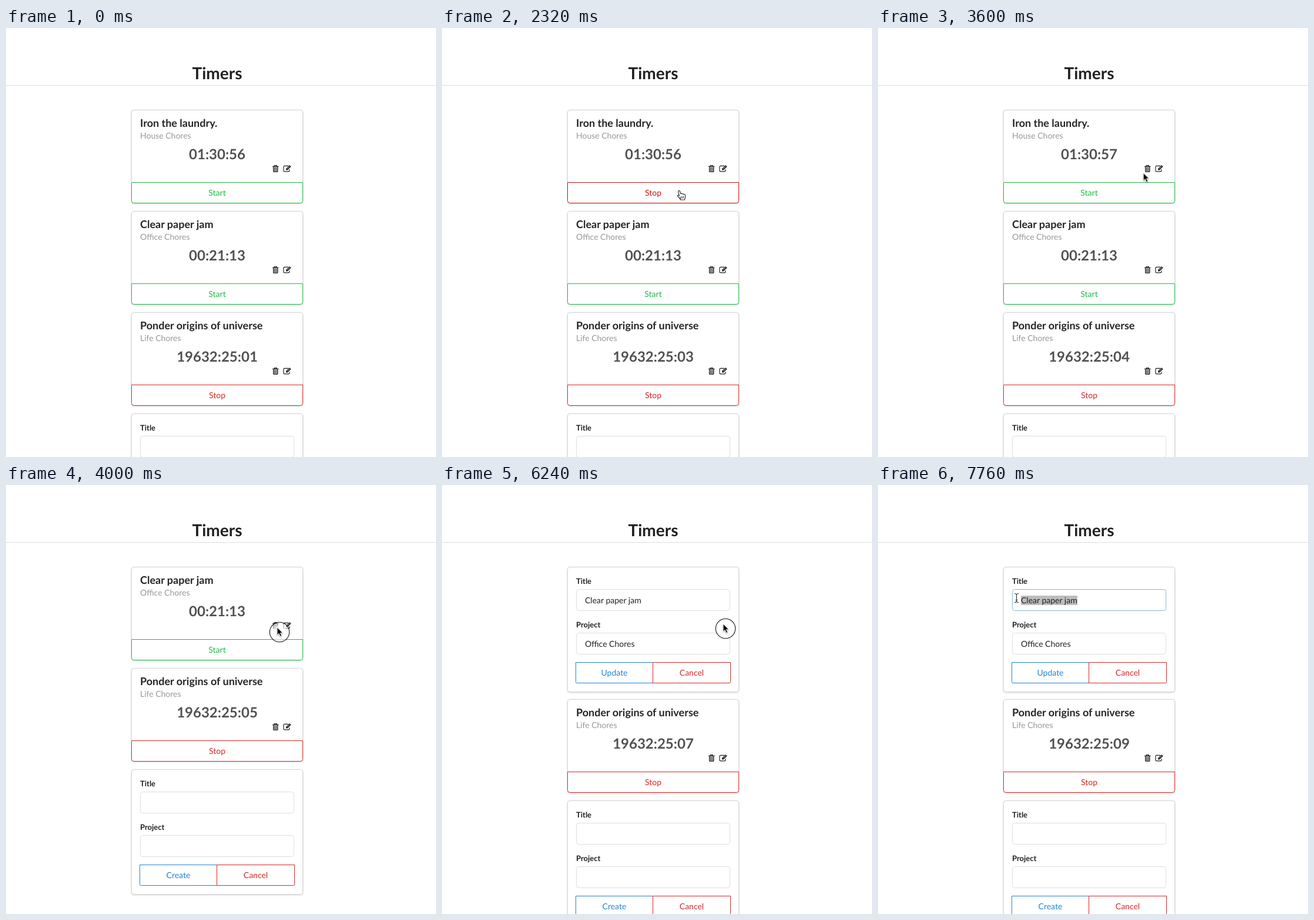
Write an HTML page that moves like this. It is 731 by 729 pixels and loops after 8 s.

```html
<!DOCTYPE html>
<html lang="en">
<head>
<meta charset="utf-8">
<title>Timers</title>
<style>
  html, body { margin: 0; width: 100%; height: 100%; overflow: hidden; background: #fff; }
  svg { display: block; font: 14px Lato, sans-serif; text-rendering: geometricPrecision; }
  .page { font: bold 28px Lato, sans-serif; fill: #212121; }
  .title { font: bold 18px Lato, sans-serif; fill: #262626; }
  .clock { font: bold 24px Lato, sans-serif; fill: #515151; }
  .label { font: bold 13px Lato, sans-serif; fill: #212121; }
  .meta { fill: #999; }
  .value { fill: #212121; }
  .mid { text-anchor: middle; }
  .card { fill: #fff; stroke: #d4d4d5; filter: drop-shadow(0 1px 1.5px #d4d4d5); }
  .arrow { filter: drop-shadow(0 1px 1px #0006); }
</style>
</head>
<body>
<svg id="stage" width="731" height="729" viewBox="0 0 731 729">
  <defs>
    <radialGradient id="glow">
      <stop offset=".5" stop-color="#fff" stop-opacity=".9"/>
      <stop offset="1" stop-color="#fff" stop-opacity=".3"/>
    </radialGradient>
    <g id="icons">
      <g fill="none" stroke="#222">
        <path d="M453 235.3H463.4M456.2 235V233.6H460.2V235" stroke-width="1.3"/>
        <path d="M454.6 236V243.4Q454.6 244.4 455.6 244.4H460.8Q461.8 244.4 461.8 243.4V236" stroke-width="1.3"/>
        <path d="M456.4 236.5V243.6M458.2 236.5V243.6M460 236.5V243.6" stroke-width="1"/>
        <path d="M480 234.4H473.8Q471.9 234.4 471.9 236.3V242Q471.9 243.9 473.8 243.9H480Q481.9 243.9 481.9 242V240.2" stroke-width="1.2"/>
      </g>
      <path d="M476 241.6V239L482 233L484.7 235.6L478.6 241.6Z" fill="#222"/>
      <path d="M478 239.2L482.2 235" stroke="#fff" stroke-width=".7"/>
    </g>
  </defs>
  <text class="page mid" x="359" y="87">Timers</text>
  <path d="M0 97.5H731" stroke="#dedede"/>
  <g id="cards"></g>
  <g id="pointer"></g>
</svg>
<script>
const LOOP = 8000, STEP = 80, TICK = 960, RING = 240;
const GREEN = ['#21ba45', '#16ab39'], RED = ['#db2828', '#c81717'], BLUE = '#2185d0';
const STARTED = 1840, STOPPED = 2800, DELETED = 4000, EDITING = 6240, FOCUSED = 7200, DRAG = 7360;
const presses = [1680, 2640, 3840, 5360, 6080, 7120];

// time, x, y of the pointer's centre
const path = [
  [1440, 412, 420], [1680, 407, 284], [2320, 407, 284], [2640, 387, 285],
  [3040, 387, 285], [3760, 465, 250], [4160, 465, 250], [4480, 469, 253],
  [4560, 469, 253], [5360, 402, 205], [5520, 402, 205], [5920, 482, 244],
  [6480, 482, 244], [7120, 346, 188], [DRAG, 346, 188], [7680, 235.5, 192]
];

const text = (cls, x, y, s, fill = '') =>
  `<text class="${cls}" x="${x}" y="${y}"${fill && ` fill="${fill}"`}>${s}</text>`;
const rect = (x, y, w, h, attrs) =>
  `<rect x="${x + .5}" y="${y + .5}" width="${w - 1}" height="${h - 1}" ${attrs}/>`;
const card = (y, h) => rect(213, y, 292, h, 'class="card" rx="4"');

function timer(y, title, project, clock, running, hover) {
  const color = (running ? RED : GREEN)[+hover];
  return card(y, 159) +
    text('title', 228, y + 29, title) + text('meta', 228, y + 49, project) +
    text('clock mid', 359, y + 84, clock) +
    `<use href="#icons" y="${y - 139}"/>` +
    `<path d="M213.5 ${y + 123.5}H504.5V${y + 154.5}q0 4-4 4H217.5q-4 0-4-4Z" fill="#fff" stroke="${color}"/>` +
    text('mid', 359, y + 146, running ? 'Stop' : 'Start', color);
}

function field(y, label, value, focused, selectFrom) {
  const selection = selectFrom < 339
    ? `<rect x="${selectFrom}" y="${y + 25}" width="${339 - selectFrom}" height="16" fill="#bdbdbd"/>` : '';
  return text('label', 228, y + 5, label) +
    rect(228, y + 14, 262, 37, `rx="4" fill="#fff" stroke="${focused ? '#85b7d9' : '#dedede'}"`) +
    selection + text('value', 243, y + 38, value);
}

function form(y, action, title = '', project = '', focused = false, selectFrom = 339) {
  return card(y, 213) +
    field(y + 24, 'Title', title, focused, selectFrom) + field(y + 98, 'Project', project) +
    `<path d="M358.5 ${y + 162.5}H227.5V${y + 195.5}q0 2 2 2H358.5" fill="none" stroke="${BLUE}"/>` +
    `<path d="M358.5 ${y + 162.5}H490.5V${y + 195.5}q0 2-2 2H358.5Z" fill="none" stroke="${RED[0]}"/>` +
    text('mid', 293, y + 185, action, BLUE) + text('mid', 424.5, y + 185, 'Cancel', RED[0]);
}

function pointerAt(t) {
  if (t < path[0][0]) return null;
  const i = path.findIndex(p => p[0] > t);
  if (i < 0) return path.at(-1).slice(1);
  const [t0, x0, y0] = path[i - 1], [t1, x1, y1] = path[i];
  const k = (t - t0) / (t1 - t0), e = k * k * (3 - 2 * k);
  return [x0 + (x1 - x0) * e, y0 + (y1 - y0) * e];
}

const cursors = {
  arrow: '<path class="arrow" d="M-4-8V5L-1 2.2L1.2 7.2L3.6 6.2L1.4 1.4H5.4Z" fill="#000" stroke="#fff" stroke-width=".9"/>',
  hand: '<path d="M-3.6 1.2L-5.3-5.5Q-5.5-7.6-3.9-7.6Q-2.7-7.6-2.2-5.8L-1.2-2.2Q.5-3.6 1.6-1.9Q3.2-2.8 4.2-1.2Q6.4-1.6 6.7.6Q7.2 4.2 5.4 8H-1.4Q-3-.0 -1.4 8Q-2.6 5.4-5.6 2.8Q-7.4.9-6.2.2Q-5.1-.4-3.6 1.2Z" fill="#fff" stroke="#333" stroke-width="1.2" stroke-linejoin="round"/>' +
    '<path d="M-.3 2V5.5M1.8 2V5.5M3.9 2V5.5" stroke="#333"/>',
  beam: '<path d="M-3.5-7.5Q0-7.5 0-5V5Q0 7.5-3.5 7.5M3.5-7.5Q0-7.5 0-5M0 5Q0 7.5 3.5 7.5M-2 3.5H2" fill="none" stroke="#333" stroke-width="1.2"/>'
};

function pointer(t, pos, hover) {
  if (!pos) return '';
  const overText = t >= 5200 && t < 5680 || t >= 6960;
  const kind = hover ? 'hand' : overText ? 'beam' : 'arrow';
  const ring = presses.some(p => t >= p && t < p + RING)
    ? '<circle r="16.7" fill="url(#glow)" stroke="#111" stroke-width="1.1"/>' : '';
  return `<g transform="translate(${pos})">${ring}${cursors[kind]}</g>`;
}

function cardsAt(t, pos, hover) {
  const universe = y => timer(y, 'Ponder origins of universe', 'Life Chores',
    '19632:25:0' + (1 + Math.floor(t / TICK)), true, false);
  const paper = y => timer(y, 'Clear paper jam', 'Office Chores', '00:21:13', false, hover && t >= DELETED);
  if (t < DELETED) {
    const running = t >= STARTED && t < STOPPED;
    return timer(139, 'Iron the laundry.', 'House Chores', t < 2720 ? '01:30:56' : '01:30:57', running, hover) +
      paper(311) + universe(483) + form(655, 'Create');
  }
  if (t < EDITING) return paper(139) + universe(311) + form(483, 'Create');
  const selectFrom = t < DRAG ? 339 : Math.min(339, Math.max(243, pos[0]));
  return form(139, 'Update', 'Clear paper jam', 'Office Chores', t >= FOCUSED, selectFrom) +
    universe(364) + form(536, 'Create');
}

const cards = document.getElementById('cards'), cursor = document.getElementById('pointer');
let shown = -1;
function draw(now) {
  const t = Math.floor(now % LOOP / STEP) * STEP;
  if (t !== shown) {
    shown = t;
    const pos = pointerAt(t);
    const hover = !!pos && t < EDITING && pos[1] > 262 && pos[1] < 298;
    cards.innerHTML = cardsAt(t, pos, hover);
    cursor.innerHTML = pointer(t, pos, hover);
  }
  requestAnimationFrame(() => draw(performance.now() - start));
}
const start = performance.now();
draw(0);
</script>
</body>
</html>
```
